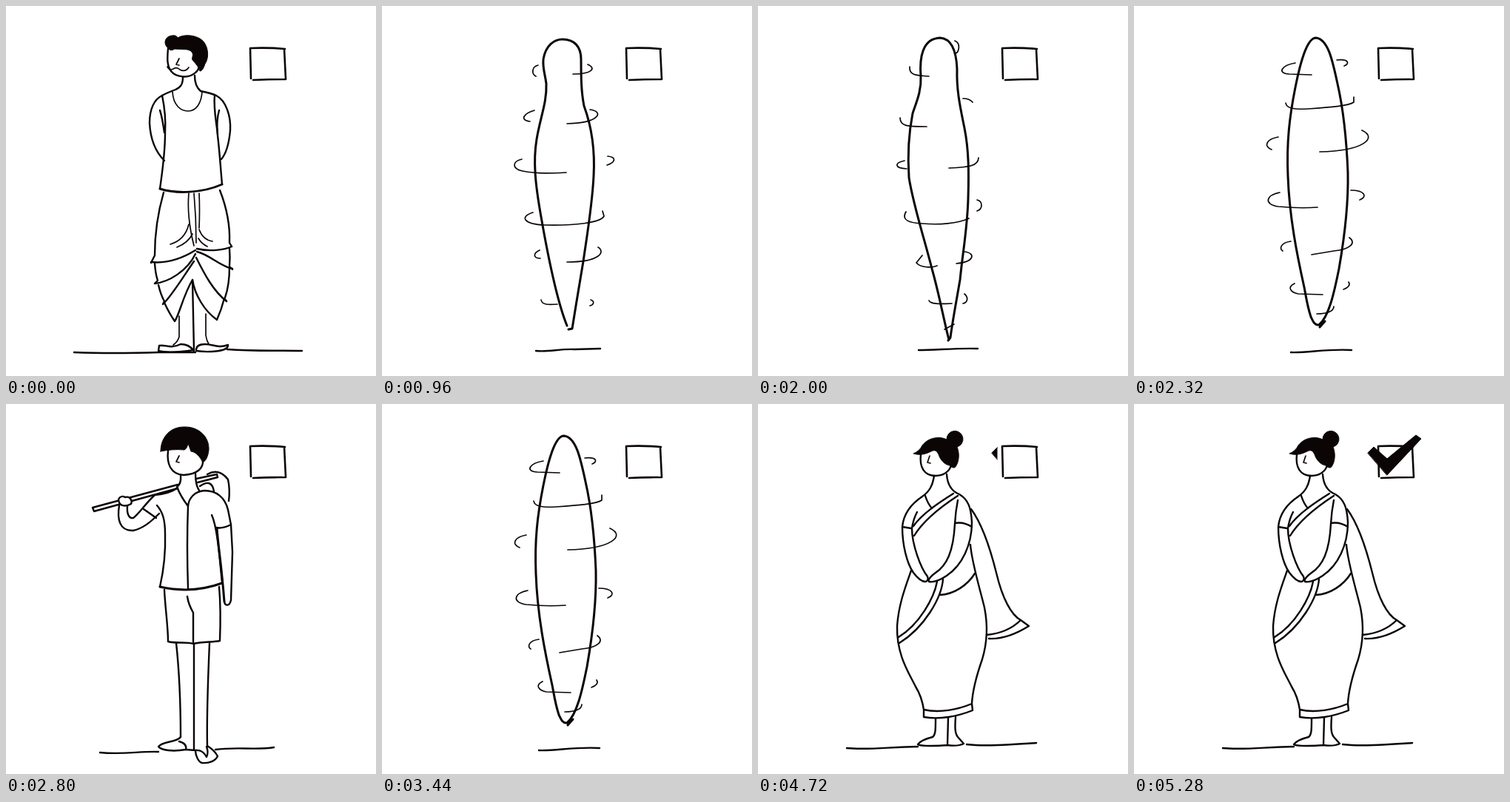
An HTML page that plays this animation: 500x500 px, repeating every 5860 ms.

```html
<!DOCTYPE html>
<html lang="en">
<head>
<meta charset="utf-8">
<title>Spinning characters</title>
<style>
html, body { margin: 0; height: 100%; overflow: hidden; background: #fff }
svg { display: block; width: 100vw; height: 100vh }
path { fill: none; stroke: #0b0506; stroke-width: 2.4; stroke-linecap: round; stroke-linejoin: round }
.ink { fill: #0b0506; stroke-width: 1 }
.bold { stroke-width: 3 }
.thin path, .thin { stroke-width: 1.7 }
</style>
</head>
<body>
<svg viewBox="0 0 500 500">
<defs>
  <!-- man in a dhoti -->
  <g id="fig0">
    <path class="ink" d="M219 57C211 50 216 40 225 40Q230 39 232 43C240 38 253 39 262 44C274 51 275 70 269 78C267 84 265 88 262 88Q260 81 253 74C249 71 255 67 251 62C247 57 236 59 228 58Q222 62 219 57Z"/>
    <path d="M219 57C218 70 217 80 223 88C230 97 248 98 256 90Q260 87 261 82"/>
    <path class="thin" d="M234 71L230 79L234 80M218 82Q221 88 226 85Q231 82 235 86Q242 90 247 83"/>
    <path d="M239 96C239 106 236 110 229 113Q216 118 211 121M255 94C255 104 257 110 263 115Q278 118 284 121"/>
    <path class="thin" d="M225 116C226 134 236 142 246 142C258 142 264 130 265 116"/>
    <path d="M211 121C200 126 194 140 194 158C195 178 201 196 214 209M208 141Q211 150 214 171M284 121C298 128 304 150 303 168C301 190 297 200 291 207M288 141Q284 155 286 173"/>
    <path d="M211 121C215 140 216 155 215 172C215 200 211 225 208 247M292 241C290 220 289 200 286 175C285 160 280 140 282 120"/>
    <path class="bold" d="M208 247C230 254 265 253 292 241"/>
    <path d="M213 252C205 280 201 310 201 337L196 347M201 348Q202 362 205 371L201 375M206 377Q209 390 214 399L212 403M214 401Q221 416 228 426C234 418 239 392 252 370C255 390 268 412 285 424C290 413 293 403 295 395L298 399M296 394C301 380 302 368 302 352L306 356M302 351Q303 340 302 328M305 325L302 320C303 295 298 272 289 249"/>
    <path class="thin" d="M247 253C245 275 248 300 254 324M254 253C256 275 257 295 257 320M261 253Q262 275 261 300M222 322Q242 316 247 295M231 326Q246 320 252 308M261 302Q266 316 279 318M260 314Q264 321 272 325"/>
    <path d="M256 330C235 343 215 348 196 346M256 335C245 358 220 373 201 375M254 345C240 365 225 390 213 402M258 328C275 332 295 330 305 325M258 332C275 336 290 352 306 355M257 340C268 362 280 385 298 399"/>
    <path class="thin" d="M234 419L234 447Q232 454 226 458M270 416L270 445Q271 452 274 457"/>
    <path d="M252 370L254 466M206 466L207 459C216 457 222 464 236 457Q247 457 253 465C240 467 218 469 206 466M257 465C257 458 264 457 269 457C280 457 286 463 300 458C301 468 270 468 257 466"/>
    <path d="M92 468C140 470 175 469 207 468H256M299 464C340 467 370 465 400 466"/>
  </g>

  <!-- woman in a long tunic -->
  <g id="fig1">
    <g id="head1">
      <path class="ink" d="M218 70C214 48 226 37 243 37C264 36 273 52 271 74Q270 90 276 108Q264 106 258 90C259 78 252 66 246 58Q236 66 218 70Z"/>
      <path d="M219 68C217 84 224 97 240 97C251 97 258 91 261 84M233 71L230 79L235 80"/>
    </g>
    <path d="M238 97C238 108 234 112 226 117C209 121 202 130 201 148C199 180 196 215 200 252Q203 262 208 253L214 165M255 95C255 107 259 112 268 117C286 121 292 132 294 150C297 180 300 215 298 250Q294 262 289 252L282 165"/>
    <path d="M230 115Q246 142 264 115M214 148C217 185 217 215 211 250C206 290 203 325 201 360C230 367 268 366 297 358C294 320 291 285 286 248C281 215 280 180 282 148"/>
    <path d="M224 364Q230 410 231 448H249L251 365L256 448H274Q278 400 278 362"/>
    <path d="M233 448Q213 457 211 464Q230 469 250 465L249 448M257 448V465Q278 469 289 463Q280 453 272 448"/>
    <path d="M133 467C160 469 185 465 211 466M288 464C315 467 345 463 375 465"/>
  </g>

  <!-- boy with a stick -->
  <g id="fig2">
    <g id="head2">
      <path class="ink" d="M209 64C209 45 222 31 240 31C260 30 275 44 274 62C273 71 270 77 266 79C262 71 257 65 250 64L246 53Q245 60 241 62C230 61 218 62 209 64Z"/>
      <path d="M219 63C217 80 222 95 240 96C258 95 267 87 266 76"/>
      <path class="thin" d="M234 70L230 78L234 79"/>
    </g>
    <path d="M236 96C237 106 234 110 231 112Q236 125 246 138M256 94C256 105 257 111 261 117M246 138Q244 190 246 249"/>
    <path d="M232 109L117 140L119 145L232 114M257 101L285 95L286 99L259 106M272 95Q288 86 300 102Q303 116 301 131M262 111Q278 100 281 118"/>
    <path d="M153 137C150 155 153 172 172 171C185 168 195 160 207 148M164 138C163 150 167 155 172 154C180 148 188 135 201 123Q222 121 232 113M186 142L203 154"/>
    <path style="fill:#fff" d="M153 133C150 127 156 123 161 126C168 124 171 131 169 135C162 139 155 138 153 133Z"/>
    <path d="M246 138C247 127 255 118 268 117C284 117 296 126 300 143L304 163Q292 169 284 167M304 163L306 200L304 265C302 274 296 273 295 267M278 150C285 165 288 200 292 242"/>
    <path class="bold" d="M285 168C287 195 291 215 295 267M208 247C235 253 265 252 292 242"/>
    <path d="M204 137C211 145 215 155 215 175C216 205 213 225 208 247"/>
    <path d="M214 251C215 275 219 300 219 321C230 324 245 321 253 324C265 321 280 322 289 320C290 295 290 270 288 247M245 260C246 268 249 275 253 282V322"/>
    <path d="M230 323C234 360 236 400 236 450M254 324V467M275 323C273 370 271 420 272 463"/>
    <path d="M236 450C230 458 212 455 206 463C210 468 225 470 243 467Q245 459 234 456M256 468C256 475 260 484 265 485C275 486 283 482 286 476Q282 468 272 462M256 468Q266 467 271 477Q274 471 271 463"/>
    <path d="M127 471C160 474 180 469 206 470M243 467L256 468M283 467C310 463 340 468 362 464"/>
  </g>

  <!-- woman in a sari -->
  <g id="fig3">
    <path class="ink" d="M255 48a11 11 0 1 1 14 10C273 68 271 78 268 83C266 88 262 86 259 83C252 82 246 75 244 68C241 62 238 62 234 64C228 67 220 70 210 67Q218 64 222 56C230 45 246 43 255 48Z"/>
    <path d="M220 68C218 85 224 97 240 97C252 97 259 90 261 83"/>
    <path class="thin" d="M232 70L229 79L233 80"/>
    <path d="M238 97C236 110 232 118 222 125C210 133 197 145 195 166C195 190 201 215 210 228Q220 241 227 240Q231 238 229 233C220 222 208 190 208 168Q210 155 215 146M195 166L207 168"/>
    <path d="M255 95C256 110 262 118 272 122C284 129 288 140 289 160C289 190 276 218 255 232Q240 242 231 240Q229 236 240 228C255 218 264 200 266 162Q267 145 270 130M266 161Q278 159 289 166"/>
    <path d="M226 124Q229 134 235 141M264 121C245 133 222 148 210 165M270 124C250 137 225 155 211 178"/>
    <path d="M288 142C305 165 315 200 322 228C330 262 342 285 355 292L366 300C350 310 330 318 312 317M355 292C345 302 330 310 309 312"/>
    <path d="M287 190C289 215 300 250 306 275C311 300 309 325 303 345C296 365 290 385 289 405L290 414C270 422 245 427 224 423V413C222 400 218 390 213 382C205 365 187 340 188 300C190 270 200 245 207 225M224 413C245 418 270 413 289 405"/>
    <path d="M246 258C265 257 283 245 293 229M250 237C248 262 225 302 191 323M242 240C238 262 218 298 190 315"/>
    <path d="M240 425C240 440 240 447 236 450Q220 454 216 460C220 463 245 462 256 461L257 424M267 423C266 437 266 445 270 450L278 459Q270 463 256 461"/>
    <path d="M120 465C150 468 180 463 216 463M282 460C310 463 345 460 376 458"/>
  </g>

  <!-- blurred spinning bodies -->
  <g id="spin0">
    <path class="bold" d="M250 432C235 395 222 325 215 285C207 240 204 210 209 180C214 150 223 130 222 105C220 90 217 85 218 72C221 53 233 45 244 45C260 45 269 55 269 72C269 95 269 115 273 135C284 165 288 195 286 230C284 270 277 310 272 345C266 380 262 405 257 436L252 437"/>
    <path d="M208 466C225 468 240 463 260 464L295 463"/>
    <g id="rings0" class="thin"><path d="M211 80C202 82 202 92 208 95M278 79C290 84 284 92 258 92M206 141C192 145 185 154 200 156M281 140C300 142 295 158 250 159M189 207C176 210 175 220 190 223C210 227 230 226 249 225M305 203C317 204 316 211 304 215M204 279C185 285 192 295 220 296C260 297 295 293 300 284L298 277M213 330C204 334 204 341 214 341M292 326C302 332 295 346 250 346M215 397C216 404 225 404 237 403M282 397C288 399 286 404 281 405"/></g>
  </g>
  <g id="spin1">
    <path class="bold" d="M258 451C250 420 245 390 235 355C225 315 210 270 204 232C202 200 204 170 209 145C214 130 221 115 220 95C218 70 222 44 246 43C262 44 268 62 269 85C268 115 274 140 279 165C285 195 285 225 284 260C283 300 277 330 273 370C267 405 263 425 260 448L257 452"/>
    <path d="M217 465C240 465 270 462 297 463"/>
    <g id="rings1" class="thin"><path d="M266 47C274 50 272 62 267 64M205 82C204 93 212 94 231 95M277 125Q286 125 290 130M192 151C192 162 200 163 228 163M198 209C184 212 184 219 201 220M298 205C298 216 285 218 258 219M200 278C193 290 205 293 222 294C245 296 270 294 285 287M296 262C304 264 304 274 296 277M222 337L214 347C220 354 235 354 242 351M279 332C295 334 292 346 268 348M231 398C233 403 245 403 262 402M279 389C285 394 283 401 277 402M252 437L265 430"/></g>
  </g>
  <g id="spin2">
    <path class="bold" d="M251 434L258 426M239 420C234 405 232 390 230 380C220 335 210 285 208 230C206 185 210 150 218 110C225 75 234 43 246 43C262 45 268 72 275 105C283 140 287 175 289 225C290 270 284 315 277 355C270 390 263 420 250 431C244 432 242 426 239 420"/>
    <path d="M212 468C235 469 260 463 294 465"/>
    <g id="rings2" class="thin"><path d="M218 77C200 80 192 91 210 92L240 93M274 73C290 71 292 78 284 81M205 131C206 138 215 140 235 139C265 137 290 135 297 130L297 123M195 177C178 180 175 190 186 194M308 168C330 178 310 196 251 197M197 252C178 256 175 268 195 271C215 273 235 273 248 272M293 249C312 249 316 258 305 262M212 318C198 320 196 328 201 331M291 313C301 320 292 329 270 331L240 336M217 375C206 380 212 387 222 389L255 390M290 373C293 377 289 381 283 383M270 406C270 412 262 416 247 416"/></g>
  </g>

  <!-- body emerging from the spin, with a head on top -->
  <g id="emerge">
    <path class="bold" d="M236 97C235 115 228 122 220 130C206 143 201 155 202 185C204 220 210 245 208 280C202 305 194 325 199 348C204 370 218 392 225 405C232 425 238 455 248 457C258 457 262 425 269 400C275 375 286 350 289 325C293 300 291 280 288 250C282 220 282 190 283 160C283 145 273 135 262 124C256 115 253 108 253 95"/>
    <path d="M176 470C220 471 270 468 319 468"/>
    <path class="thin" d="M191 140C210 148 260 140 285 135C300 130 300 121 284 119M185 185C184 197 205 200 238 195M300 168C308 175 305 185 266 188M196 222C187 226 187 236 200 235M299 222C303 235 280 242 245 238M200 273C180 285 220 287 256 285M302 265C312 272 303 285 267 287M190 348C184 358 215 353 250 349M297 324C304 332 297 340 266 345M211 399C225 405 255 403 272 400M282 390Q285 397 278 397M224 424Q228 429 242 428"/>
  </g>
  <g id="head3">
    <path class="ink" d="M245 50C236 44 236 31 246 27C258 21 271 28 271 39C271 47 266 52 262 53Q271 57 275 67Q268 70 262 61Q255 54 245 55C240 63 228 69 208 68L218 66C222 56 234 49 245 50Z"/>
    <path class="bold" d="M217 68C214 85 224 97 240 97C258 97 268 88 268 70M269 394V403"/>
    <path class="thin" d="M226 124L243 147M212 82C202 83 203 89 212 90M222 89H238M235 89V97M276 77L279 79"/>
    <path d="M263 125C240 145 220 165 214 195M267 127C245 147 227 168 217 193"/>
  </g>
  <clipPath id="wipe"><rect id="edge" x="314" y="38" width="0" height="62"/></clipPath>
</defs>

<path style="stroke-width:2.6" d="M331 98L330 57Q355 56 377 58M376 58L378 99Q355 99 334 100"/>
<use id="body"/>
<use id="extra"/>
<path class="ink" clip-path="url(#wipe)" d="M316 66L324 58L342 74L381 42L388 47L342 96Z"/>
</svg>
<script>
const LOOP = 5860, STEP = 80, IN = 8, TICK = 4720;
// start time, step at which the figure rests, and the step where a given sketch sits unmirrored
const turns = [
  { start: 480, end: 14, key: 6, sketch: 0 },
  { start: 1760, end: 13, key: 3, sketch: 1 },
  { start: 3040, end: 13, key: 5, sketch: 2 },
];
const settle = [[.8, 1.08], [1.1, .94], [.96, 1.03], [1.02, .985]];
const get = id => document.getElementById(id);
const body = get('body'), extra = get('extra'), edge = get('edge');

function put(el, id, sx = 1, sy = 1) {
  el.setAttribute('href', id ? '#' + id : '');
  el.setAttribute('transform', `translate(248 468) scale(${sx} ${sy}) translate(-248 -468)`);
}

function pose(t) {
  const i = turns.findLastIndex(turn => t >= turn.start);
  put(extra, '');
  if (i < 0) return put(body, 'fig0');
  const { start, end, key, sketch } = turns[i];
  const k = Math.floor((t - start) / STEP), n = k - key;
  const blur = (sketch + n + 9) % 3, side = n % 2 ? -1 : 1;
  if (k >= end) put(body, 'fig' + (i + 1));
  else if (k > IN + 1) put(body, 'fig' + (i + 1), ...settle[k - IN - 2]);
  else if (k === IN + 1) {
    put(body, 'emerge');
    put(extra, 'head' + (i + 1));
  } else if (k > 1) put(body, 'spin' + blur, side);
  else {
    put(body, 'fig' + i, ...(k ? [.65, 1] : [.93, .97]));
    if (k) put(extra, 'rings' + blur, side);
  }
}

function draw(now) {
  const t = now % LOOP;
  pose(t);
  const part = Math.floor((t - TICK) / STEP) + 1;
  edge.setAttribute('width', 76 * Math.min(1, Math.max(0, part / 8)));
}

const begin = performance.now();
function frame() {
  draw(performance.now() - begin);
  requestAnimationFrame(frame);
}
frame();
</script>
</body>
</html>
```
